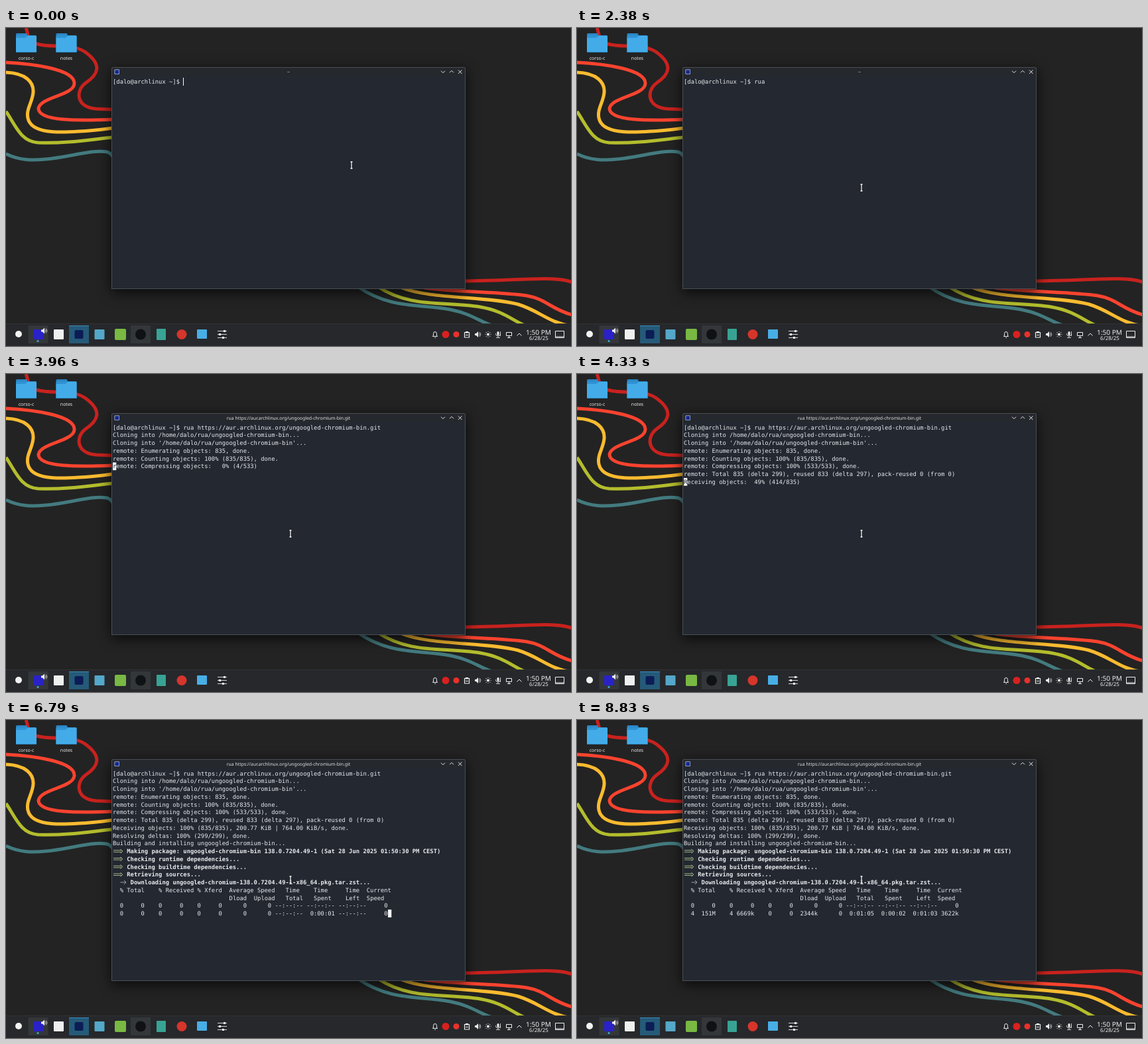
Write an HTML page with a canvas that moves like this. It is 852 px wide and 480 px high and loops after 9.29 s.

```html
<!DOCTYPE html>
<html lang="en">
<head>
<meta charset="utf-8">
<title>Terminal session</title>
<style>
html, body { margin: 0; width: 100%; height: 100%; overflow: hidden; background: #232323; }
canvas { display: block; }
</style>
</head>
<body>
<canvas id="stage" width="852" height="480"></canvas>
<script>
const c = document.getElementById('stage').getContext('2d');
const LOOP = 9290;
const LEFT = 161, TOP = 74.7, COL = 5.32, ROW = 11.75;
const SANS = '"Noto Sans", sans-serif';
const MONO = '8.84px "DejaVu Sans Mono", monospace';
const INK = '#e9ebee', TERM = '#232831', PANEL = '#26282b';

const URL_TEXT = 'https://aur.archlinux.org/ungoogled-chromium-bin.git';
const PROMPT = '[dalo@archlinux ~]$ ';

// ---------- drawing helpers ----------
function rect(x, y, w, h, color) {
  c.fillStyle = color;
  c.fillRect(x, y, w, h);
}
function box(x, y, w, h, r, color) {
  c.fillStyle = color;
  c.beginPath();
  c.roundRect(x, y, w, h, r);
  c.fill();
}
function dot(x, y, r, color) {
  c.fillStyle = color;
  c.beginPath();
  c.arc(x, y, r, 0, 7);
  c.fill();
}
function stroke(d, color, width = 1) {
  c.strokeStyle = color;
  c.lineWidth = width;
  c.stroke(new Path2D(d));
}
function shape(d, color) {
  c.fillStyle = color;
  c.fill(new Path2D(d));
}
function label(s, x, y, size, color = '#eee') {
  c.font = `${size}px ${SANS}`;
  c.textAlign = 'center';
  c.fillStyle = color;
  c.fillText(s, x, y);
}

// ---------- desktop ----------
const ribbons = [
  ['#c8221e', 'M30 0C35 10 30 19 46 24C70 31 98 22 119 36C147 56 138 71 120 83C104 95 106 120 136 122L161 123'],
  ['#f9432f', 'M0 52C40 54 104 62 103 84C102 102 52 104 49 121C48 141 110 140 161 138'],
  ['#fabb30', 'M0 67C30 68 42 82 41 97C40 112 30 122 33 136C38 160 80 158 110 156C130 155 145 153 161 151'],
  ['#b3bd2d', 'M0 126C15 148 22 171 48 173C90 175 130 168 161 165'],
  ['#437b7f', 'M0 190C20 200 40 200 60 198C95 195 130 183 152 187C157 188 160 192 162 196'],
  ['#c8221e', 'M690 382C740 382 790 378 815 378.500C835 379 845 380 854 384'],
  ['#f9432f', 'M630 392C680 399 745 398 785 404C815 409 822 425 854 433'],
  ['#fabb30', 'M594 391C640 410 720 404 772 417C805 427 820 446 854 450'],
  ['#b3bd2d', 'M560 390C610 423 660 412 715 421C755 428 765 444 790 452'],
  ['#437b7f', 'M530 390C580 425 625 416 670 425C705 432 715 445 742 452']
];

function folder(x, name) {
  box(x, 8, 17, 8, 1.5, '#2b86c4');
  box(x, 11, 31, 26, 1.5, '#2f93d3');
  shape(`M${x} 15H${x + 14}L${x + 18} 12H${x + 31}V36Q${x + 31} 37 ${x + 30} 37H${x + 1}Q${x} 37 ${x} 36Z`, '#43ace8');
  rect(x, 36, 31, 1, '#2c83bd');
  label(name, x + 15.5, 47.7, 7);
}

function desktop() {
  rect(0, 0, 852, 480, '#232323');
  for (const [color, d] of ribbons) stroke(d, color, 5);
  folder(15, 'corso-c');
  folder(75.5, 'notes');
}

function speaker(x, y) {
  shape(`M${x - 4} ${y - 1.5}h2l3 -3v9l-3 -3h-2z`, '#f2f2f2');
  stroke(`M${x + 2} ${y - 2}q2 2 0 4M${x + 3} ${y - 3.500}q3.500 3.500 0 7`, '#f2f2f2', 0.8);
}

function panel() {
  rect(0, 446, 852, 34, PANEL);
  rect(0, 446, 852, 1, '#303235');
  rect(33.5, 449, 30, 27, '#34373a');
  rect(95, 449, 30, 27, '#255a78');
  rect(95, 449, 30, 1, '#3b8dba');
  rect(188, 449, 30, 27, '#34373a');

  dot(19, 462, 5, '#f2f2f2');
  box(41, 455, 15, 15, 1, '#2a22c9');
  dot(48, 472.5, 1.5, '#3daee9');
  speaker(57, 457);
  box(72, 455, 15, 15, 1, '#efefef');
  box(103.5, 456, 13, 13, 2, '#0c1d55');
  box(133.5, 455, 15, 15, 1, '#54a8c9');
  box(164, 454, 17, 17, 2, '#79b843');
  dot(203, 462.5, 8, '#101114');
  box(227, 454, 14, 17, 1, '#38a394');
  dot(265, 462.5, 7.5, '#d6352b');
  box(288, 455, 15, 14, 1, '#48aee6');

  // sliders
  stroke('M319 457.500h14M319 462.500h14M319 467.500h14', '#d6d6d6', 1);
  rect(328, 456, 3, 3, '#f2f2f2');
  rect(321, 461, 3, 3, '#f2f2f2');
  rect(326, 466, 3, 3, '#f2f2f2');

  // tray
  const w = '#f0f0f0';
  stroke('M643.500 465.500h7l-1 -1.500v-2.500q0 -3 -2.500 -3t-2.500 3v2.500zM646.500 467.500h1.500', w);
  dot(663, 462.5, 5.5, '#d8211f');
  dot(679, 462.5, 4.5, '#e8312c');
  stroke('M691.500 459.500h7v7.500h-7z', w, 1.2);
  rect(693, 458, 4, 2.5, w);
  rect(693, 463, 4, 1, w);
  speaker(711, 462.5);
  dot(727, 462.5, 2, w);
  for (let i = 0; i < 8; i++) {
    const a = i * Math.PI / 4;
    dot(727 + 4 * Math.cos(a), 462.5 + 4 * Math.sin(a), 0.6, w);
  }
  box(740.5, 458, 3, 6, 1.5, w);
  stroke('M738.500 461v1q0 3 3.500 3t3.500 -3v-1M742 465v2M739 467.500h6M745.500 458v7', w, 0.8);
  stroke('M754.500 459.500h8v5h-8zM758.500 465v2.500M756 467.500h5', w);
  stroke('M770.500 464.500l3.500 -3.500l3.500 3.500', w);
  label('1:50 PM', 803, 462.7, 10.1);
  label('6/28/25', 803.5, 471, 8);
  stroke('M828.500 457.500h13v10h-13zM828.500 466h13', w);
}

function frame(title) {
  c.save();
  c.shadowColor = 'rgba(0,0,0,.75)';
  c.shadowBlur = 20;
  c.shadowOffsetY = 5;
  box(159, 59, 534, 335, [3, 3, 0, 0], '#4a4e54');
  c.restore();
  box(160, 60, 532, 333, [2, 2, 0, 0], '#25282d');
  rect(160, 73, 532, 320, TERM);
  box(163.5, 62.5, 7.5, 7.5, 1, '#b9c3e6');
  rect(164.3, 63.3, 6, 6, '#15298c');
  label(title, 426, 68.6, 6.86, '#e2e2e2');
  stroke('M656 64.700l3 3l3 -3M669 67.300l3 -3l3 3M682 63.500l5.500 5.500M687.500 63.500l-5.500 5.500', '#e6e6e6');
}

// ---------- terminal ----------
const cellX = col => LEFT + col * COL;
const cellY = row => TOP + row * ROW;

function text(row, s, { col = 0, bold = false, color = INK } = {}) {
  c.font = (bold ? 'bold ' : '') + MONO;
  c.textAlign = 'left';
  c.fillStyle = color;
  c.fillText(s, cellX(col), cellY(row) + 9);
}

function step(row, s) {
  const y = cellY(row) + 5.8;
  stroke(`M162 ${y - 1.3}h12M162 ${y + 1.3}h12M172.500 ${y - 3}l3.500 3l-3.500 3`, '#b4c68d', 0.9);
  text(row, s, { col: 4, bold: true });
}

function percent(n, total) {
  return String(Math.floor(n / total * 100)).padStart(3) + `% (${n}/${total})`;
}
function progress(t, from, to, first, total) {
  const k = Math.min(1, Math.max(0, (t - from) / (to - from)));
  return Math.round(first + (total - first) * k);
}

const ZERO = '  0     0    0     0    0     0      0      0 --:--:-- ';
const meter = [
  [6790, ZERO + ' 0:00:01 --:--:--     0'],
  [7580, '  1  151M    1 2117k    0     0  1160k      0  0:02:13  0:00:01  0:02:12 1160k'],
  [8630, '  4  151M    4 6669k    0     0  2344k      0  0:01:05  0:00:02  0:01:03 3622k']
];

// Lines that appear whole: [time, row, draw]
const output = [
  [3290, 1, r => text(r, 'Cloning into /home/dalo/rua/ungoogled-chromium-bin...')],
  [3330, 2, r => text(r, "Cloning into '/home/dalo/rua/ungoogled-chromium-bin'...")],
  [3960, 3, r => text(r, 'remote: Enumerating objects: 835, done.')],
  [3960, 4, r => text(r, 'remote: Counting objects: 100% (835/835), done.')],
  [4130, 6, r => text(r, 'remote: Total 835 (delta 299), reused 833 (delta 297), pack-reused 0 (from 0)')],
  [4630, 9, r => text(r, 'Building and installing ungoogled-chromium-bin...')],
  [5710, 10, r => step(r, 'Making package: ungoogled-chromium-bin 138.0.7204.49-1 (Sat 28 Jun 2025 01:50:30 PM CEST)')],
  [5710, 11, r => step(r, 'Checking runtime dependencies...')],
  [5790, 12, r => step(r, 'Checking buildtime dependencies...')],
  [5880, 13, r => step(r, 'Retrieving sources...')],
  [5920, 14, r => {
    const y = cellY(r) + 5.8;
    stroke(`M172.500 ${y}h8.500M178 ${y - 3}l3 3l-3 3`, '#a9b3c2', 0.9);
    text(r, 'Downloading ungoogled-chromium-138.0.7204.49-1-x86_64.pkg.tar.zst...', { col: 5, bold: true });
  }],
  [6040, 15, r => text(r, '  % Total    % Received % Xferd  Average Speed   Time    Time     Time  Current')],
  [6040, 16, r => text(r, 'Dload  Upload   Total   Spent    Left  Speed', { col: 33 })],
  [6040, 17, r => text(r, ZERO + '--:--:-- --:--:--     0')]
];

// Lines that count up: [row, label, start, end, first, total, tail]
const counters = [
  [5, 'remote: Compressing objects: ', 3960, 4130, 1, 533, ', done.'],
  [7, 'Receiving objects: ', 4130, 4540, 9, 835, ', 200.77 KiB | 764.00 KiB/s, done.'],
  [8, 'Resolving deltas: ', 4540, 4630, 0, 299, ', done.']
];

// Block cursor: [from, to, row, column]
const blocks = [
  [3210, 3290, 1, 0], [3290, 3330, 2, 0], [3330, 3540, 3, 0], [3790, 3960, 3, 0],
  [3960, 4130, 5, 0], [4130, 4540, 7, 0], [4540, 4630, 8, 0], [4630, 5230, 10, 0],
  [5710, 5790, 12, 0], [5790, 5880, 13, 0], [5880, 5920, 14, 0], [5920, 6040, 15, 0], [6040, 6420, 18, 0],
  [6790, 7060, 18, 78], [7580, 7790, 18, 78], [8040, 8290, 18, 78], [8630, 8810, 18, 78]
];

function terminal(t) {
  const typed = 'rua '.slice(0, [1000, 1210, 1420, 1620].filter(at => t >= at).length);
  const pasted = t >= 2580, marked = pasted && t < 3210;
  text(0, PROMPT + typed);
  if (marked) rect(cellX(24), 74.5, 52 * COL, 12, '#f4f5f6');
  if (pasted) text(0, URL_TEXT, { col: 24, color: marked ? '#20242b' : INK });
  const barHidden = (t >= 170 && t < 750) || t >= 2380;
  if (!barHidden) rect(Math.round(cellX(20 + typed.length)), 75, 1, 12, '#fff');

  for (const [at, row, draw] of output) if (t >= at) draw(row);
  for (const [row, name, from, to, first, total, tail] of counters) {
    if (t < from) continue;
    const n = progress(t, from, to, first, total);
    text(row, name + percent(n, total) + (n === total ? tail : ''));
  }
  const line = meter.filter(m => t >= m[0]).pop();
  if (line) text(18, line[1]);

  const block = blocks.find(b => t >= b[0] && t < b[1]);
  if (block) {
    const [, , row, col] = block;
    rect(cellX(col), cellY(row), COL, ROW, '#f4f5f6');
    if (row === 5) text(row, 'r', { color: '#20242b' });
    if (row === 7 || row === 8) text(row, 'R', { color: '#20242b' });
  }
}

// ---------- pointer ----------
function pointer(t) {
  let x = 521, y = 207;
  if (t >= 40) [x, y] = [477, 224];
  if (t >= 170) {
    const k = Math.min(1, Math.max(0, (t - 380) / 200));
    x = 436 - 7 * k;
    y = 243 - 2 * k;
  }
  const beam = `M${x - 1.5} ${y - 5}h3M${x} ${y - 5}v10M${x - 1.5} ${y + 5}h3`;
  stroke(beam, 'rgba(0,0,0,.55)', 2.6);
  stroke(beam, '#fff', 1.3);
}

function render(t) {
  c.textRendering = 'geometricPrecision';
  desktop();
  frame(t < 3290 ? '~' : 'rua ' + URL_TEXT);
  terminal(t);
  panel();
  pointer(t);
}

const start = performance.now();
function tick() {
  render((performance.now() - start) % LOOP);
  requestAnimationFrame(tick);
}
tick();
</script>
</body>
</html>
```
